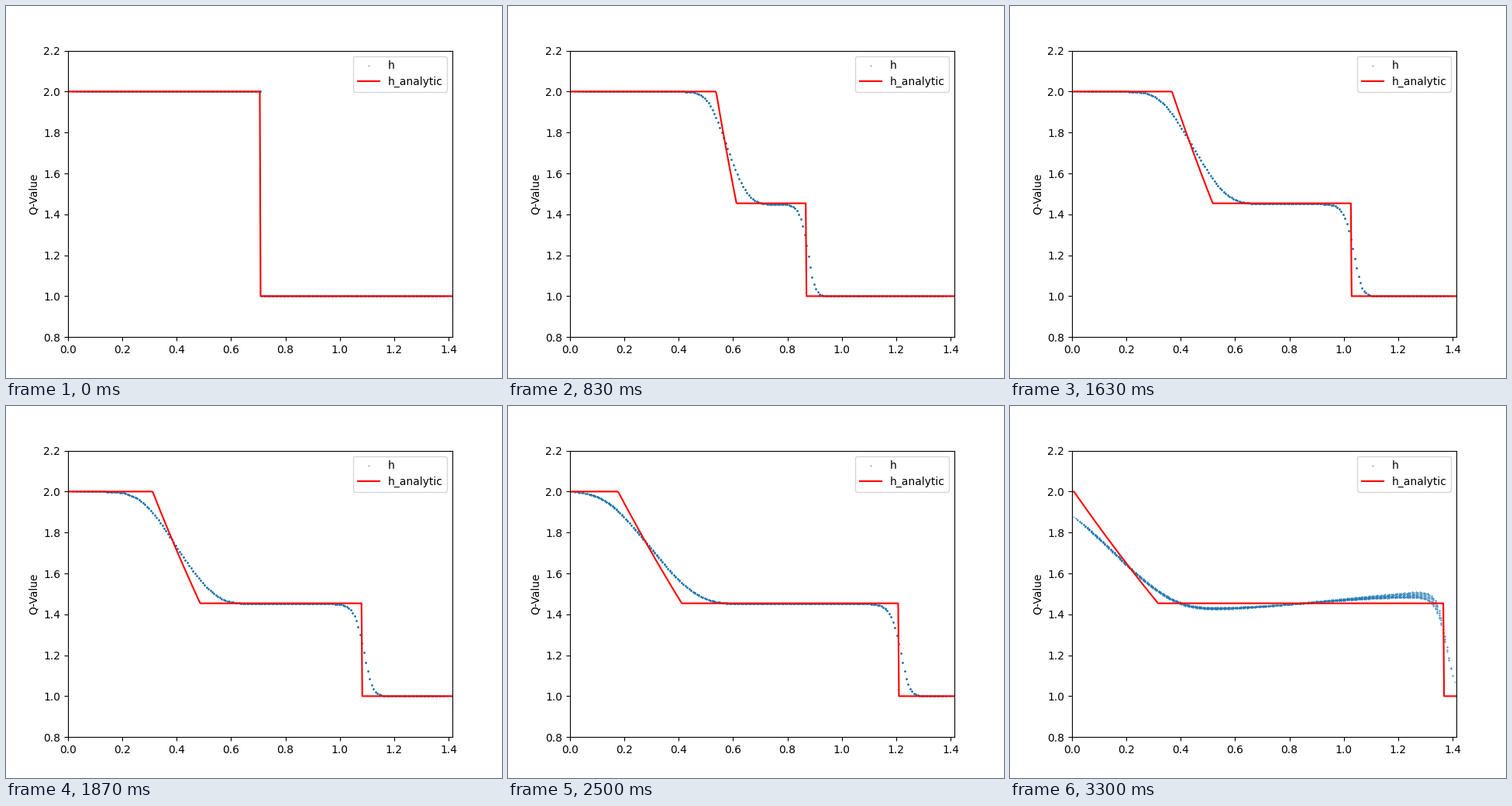
These frames come from a looping animation (640x480 px, 3.33 s). A matplotlib script:

```python
import numpy as np
import matplotlib.pyplot as plt
from matplotlib.animation import FuncAnimation

FRAMES = 100
INTERVAL = 33.3
DT_FRAME = 0.005
SUBSTEPS = 5
N = 100                 # cells per side of the unit square
DX = 1 / N
BAND = 10               # cells this close to the diagonal are plotted
DIAG = np.sqrt(2)
H_LEFT, H_RIGHT = 2.0, 1.0


def flux(q, k):
    """Shallow water flux along axis k (g = 1) and the local wave speed."""
    h = q[0]
    u = q[k] / h
    f = u * q
    f[k] += h ** 2 / 2
    return f, np.abs(u) + np.sqrt(h)


def divergence(q, k):
    """Rusanov flux difference along axis k with open boundaries."""
    pad = [(0, 0)] * 3
    pad[k] = (1, 1)
    q = np.pad(q, pad, mode="edge")
    f, speed = flux(q, k)
    lo = [slice(None)] * 3
    hi = [slice(None)] * 3
    lo[k], hi[k] = slice(None, -1), slice(1, None)
    lo, hi = tuple(lo), tuple(hi)
    a = np.maximum(speed[lo[1:]], speed[hi[1:]])
    face = (f[lo] + f[hi]) / 2 - a * (q[hi] - q[lo]) / 2
    return np.diff(face, axis=k) / DX


def simulate():
    """Positions along the diagonal and water heights for every frame."""
    i, j = np.indices((N, N))
    near = np.abs(i - j) <= BAND
    q = np.zeros((3, N, N))
    q[0] = np.where(i + j <= N - 1, H_LEFT, H_RIGHT)
    dt = DT_FRAME / SUBSTEPS
    heights = [q[0][near]]
    for _ in range(FRAMES - 1):
        for _ in range(SUBSTEPS):
            q = q - dt * (divergence(q, 1) + divergence(q, 2))
        heights.append(q[0][near])
    pos = (i + j + 1)[near] * DX / DIAG
    return pos, heights


def middle_height():
    """Height between rarefaction and shock, by bisection."""
    lo, hi = H_RIGHT, H_LEFT
    for _ in range(60):
        h = (lo + hi) / 2
        u_fan = 2 * (np.sqrt(H_LEFT) - np.sqrt(h))
        u_shock = (h - H_RIGHT) * np.sqrt((h + H_RIGHT) / (2 * h * H_RIGHT))
        if u_fan > u_shock:
            lo = h
        else:
            hi = h
    return h


C_LEFT = np.sqrt(H_LEFT)
H_MID = middle_height()
U_MID = 2 * (C_LEFT - np.sqrt(H_MID))
SHOCK = H_MID * U_MID / (H_MID - H_RIGHT)


def analytic(x, t):
    """Exact dam break solution with the dam at half the diagonal."""
    d = x - DIAG / 2
    if t == 0:
        return np.where(d <= 0, H_LEFT, H_RIGHT)
    fan = (2 * C_LEFT - d / t) ** 2 / 9
    h = np.clip(fan, H_MID, H_LEFT)
    h = np.where(d > (U_MID - np.sqrt(H_MID)) * t, H_MID, h)
    return np.where(d > SHOCK * t, H_RIGHT, h)


pos, heights = simulate()
xs = np.linspace(0, DIAG, 500)

fig, ax = plt.subplots(figsize=(6.4, 4.8), dpi=100)
dots = ax.scatter(pos, heights[0], s=0.1, label="h")
line, = ax.plot(xs, analytic(xs, 0), color="red", label="h_analytic")
ax.set_xlim(0, DIAG)
ax.set_ylim(0.8, 2.2)
ax.set_ylabel("Q-Value")
ax.legend(loc="upper right")


def update(k):
    dots.set_offsets(np.column_stack([pos, heights[k]]))
    line.set_ydata(analytic(xs, k * DT_FRAME))
    return dots, line


anim = FuncAnimation(fig, update, frames=FRAMES, interval=INTERVAL, repeat=True)
plt.show()
```
